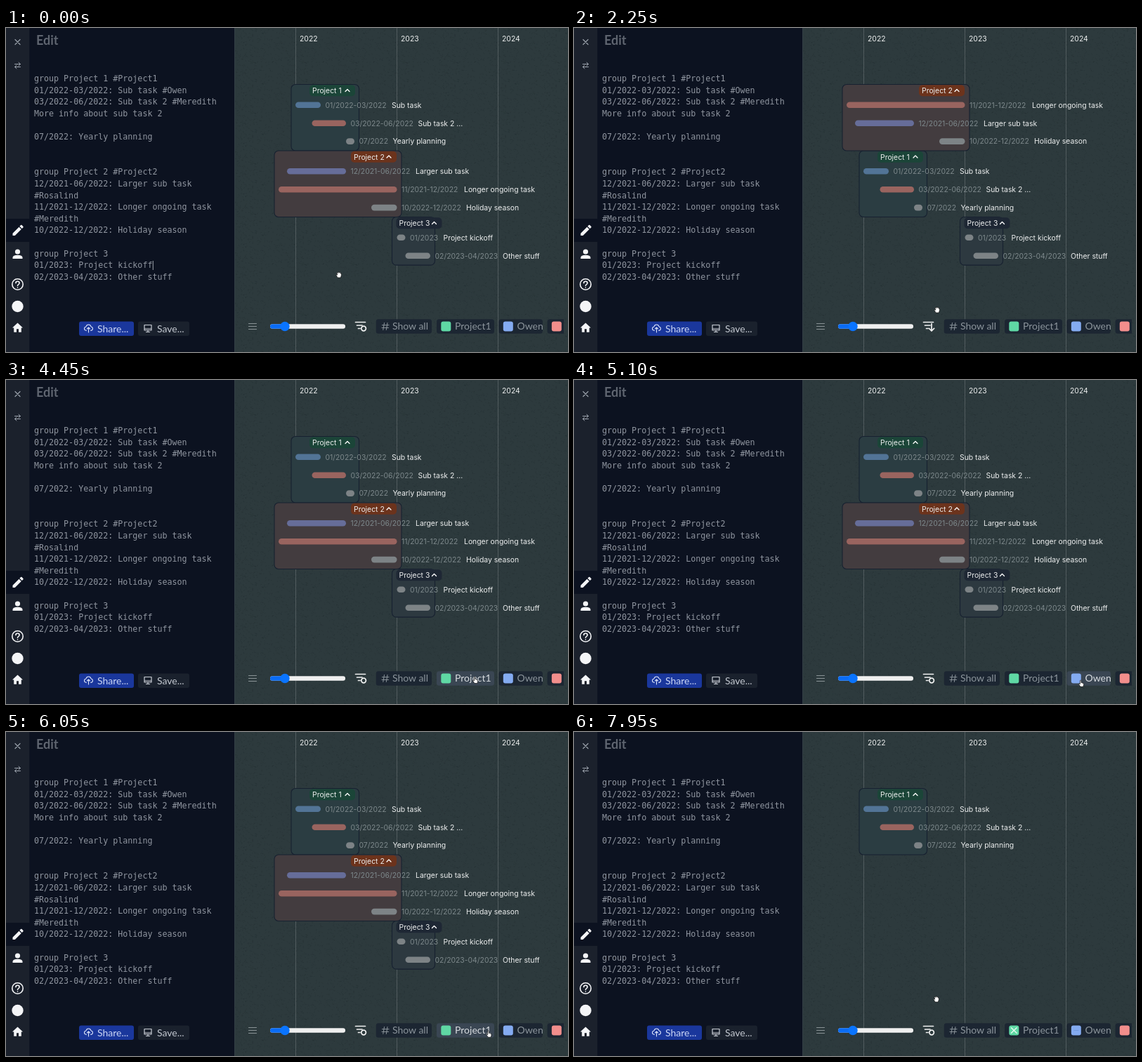
These frames come from a looping animation (800x462 px, 8 s). An HTML page:

```html
<!DOCTYPE html>
<html lang="en">
<head>
<meta charset="utf-8">
<title>Timeline editor</title>
<style>
  html, body { margin: 0; width: 100%; height: 100%; overflow: hidden; background: #0c1220; }
  svg { display: block; width: 100vw; height: 100vh; }
  text { white-space: pre; }
  .mono { font: 11.66px "DejaVu Sans Mono", monospace; fill: #8f959f; }
  .ui { font: 14px Lato, sans-serif; }
  .tl { font: 10.4px Inter, sans-serif; fill: #eceeee; }
  .date { fill: #7d888b; }
  .line { fill: none; stroke-linecap: round; stroke-linejoin: round; }
</style>
</head>
<body>
<svg id="stage" viewBox="0 0 800 462">
  <defs>
    <pattern id="grain" width="72" height="72" patternUnits="userSpaceOnUse">
      <path id="specks" class="line" stroke="#1b2629" stroke-opacity=".3" stroke-width=".9"/>
    </pattern>
    <clipPath id="chipClip"><rect x="526.5" y="410" width="267.5" height="32"/></clipPath>
  </defs>

  <rect x="325" width="475" height="462" fill="#2d3a3d"/>
  <rect x="325" width="475" height="462" fill="url(#grain)"/>
  <g id="years"></g>
  <g id="groups"></g>

  <rect width="33.5" height="462" fill="#1b212c"/>
  <rect x="33.5" width="292" height="462" fill="#0c1220"/>
  <rect y="272" width="34" height="33" fill="#0c1220"/>
  <path d="M325.5 0V462" stroke="#39444b" stroke-width=".8"/>

  <text x="43" y="24" font-family="Lato, sans-serif" font-weight="700" font-size="18" fill="#5f6570">Edit</text>
  <g id="source"></g>
  <path id="caret" d="M209.3 332V345" stroke="#c4c9d0" stroke-width=".8"/>

  <g class="line" stroke="#9aa1ab" stroke-width="1.2">
    <path d="M13 16.5l7 7m0-7l-7 7"/>
    <path d="M12.500 51.500h8m-2.500-2.500l2.500 2.500-2.500 2.500M20.500 55.500h-8m2.500-2.500l-2.500 2.500 2.500 2.500" stroke-width="1"/>
  </g>
  <g fill="#f4f5f7">
    <path d="M9.500 296v-3.300l9-9 3.300 3.300-9 9zM19.400 282.800l1.700-1.700q.7-.6 1.400 0l1.900 1.900q.6.700 0 1.400l-1.700 1.700z"/>
    <circle cx="16.500" cy="319" r="3.600"/>
    <path d="M9.500 329v-1.600q0-3.600 7-3.600t7 3.600v1.600z"/>
    <circle cx="16.500" cy="397" r="8.200"/>
    <path d="M9 427.500l7.500-7 7.500 7h-2.200v6.300h-3.800v-4.500h-3v4.500h-3.800v-6.300z"/>
  </g>
  <g class="line" stroke="#f4f5f7" stroke-width="1.600">
    <circle cx="16.500" cy="365.500" r="7.700"/>
    <path d="M13.900 363.800q0-2.500 2.600-2.500t2.600 2.300q0 1.200-1.300 2t-1.300 1.900M16.500 370v.1"/>
  </g>

  <rect x="104" y="418.500" width="78" height="20.500" rx="3" fill="#1a379c"/>
  <g class="line" stroke="#dbe3fa" stroke-width="1.100">
    <path d="M114.500 431.500q-3-.3-3-2.900 0-2.200 2.400-2.600.7-3 3.600-3t3.600 3q2.300.4 2.300 2.700 0 2.500-2.900 2.800M117.500 434v-7m-2 2l2-2 2 2"/>
  </g>
  <text x="130" y="433.500" class="ui" fill="#ccd7f6">Share...</text>
  <rect x="188" y="418.500" width="73" height="20.500" rx="3" fill="#1a212d"/>
  <path class="line" stroke="#c9ced6" stroke-width="1.200" d="M197 423.500h10v7.500h-10zM197 429h10M202 431v2.500m-2.500 0h5"/>
  <text x="215" y="433.500" class="ui" fill="#c3c8d0">Save...</text>

  <path class="line" stroke="#8b9497" stroke-width="1.200" d="M345.500 421.500h11M345.500 425.500h11M345.500 429.500h11"/>
  <rect x="376" y="422.300" width="107" height="6.500" rx="3.200" fill="#efefef"/>
  <rect x="376" y="422.300" width="22" height="6.500" rx="3.200" fill="#0a6cf5"/>
  <circle cx="397" cy="425.500" r="6.700" fill="#0a74ff"/>
  <path class="line" stroke="#f2f3f3" stroke-width="1.700" d="M497.500 419.500h14M499.500 424h7.500M501.500 428.500h2.500"/>
  <path id="sortMark" class="line" stroke="#f2f3f3" stroke-width="1.700"/>

  <g clip-path="url(#chipClip)"><g id="chips"></g></g>
  <g id="cursor" fill="#fff" stroke="#111" stroke-width=".7" stroke-linejoin="round">
    <path id="grab" d="M-2 4l-1.800-3.300q-.6-1.300.6-1.300l.9.800-.7-3q.2-1.200 1.200-.5l.5.800.3-1.200q.8-.8 1.400 0l.2 1 .7-.7q1-.2 1 .8v1l.6-.4q.8 0 .7 1l-.5 2.700-.8 2.300z"/>
    <path id="point" d="M-1 4.500l-2.400-3.400q-.5-1.300.8-1l1 .9v-4.700q0-1.100.8-1.100t.8 1.100v2.500q1-.4 1.300.3 1-.3 1.200.5 1.100-.2 1.100.8v1.700l-.8 2.400z"/>
  </g>
</svg>
<script>
const LOOP = 8000, FILTER_AT = 6300;
const $ = id => document.getElementById(id);

function add(parent, tag, attrs, text) {
  const el = document.createElementNS("http://www.w3.org/2000/svg", tag);
  for (const key in attrs) el.setAttribute(key, attrs[key]);
  if (text) el.textContent = text;
  parent.appendChild(el);
  return el;
}
const move = (el, x, y) => el.setAttribute("transform", `translate(${x} ${y})`);
const show = (el, on) => el.setAttribute("visibility", on ? "visible" : "hidden");

// Background grain
let seed = 7;
const rand = () => (seed = (seed * 16807) % 2147483647) / 2147483647;
let specks = "";
for (let i = 0; i < 330; i++) {
  specks += `M${(rand() * 72).toFixed(1)} ${(rand() * 72).toFixed(1)}l${(rand() * 4 - 2).toFixed(1)} ${(rand() * 3 - 1).toFixed(1)}`;
}
$("specks").setAttribute("d", specks);

// Year columns
[2022, 2023, 2024].forEach((year, i) => {
  const x = 412.5 + i * 144;
  add($("years"), "path", { d: `M${x} 0V462`, stroke: "#fff", "stroke-opacity": .2, "stroke-width": .9 });
  add($("years"), "text", { x: x + 5.5, y: 18.5, class: "tl" }, String(year));
});

// Editor text
`group Project 1 #Project1
01/2022-03/2022: Sub task #Owen
03/2022-06/2022: Sub task 2 #Meredith
More info about sub task 2

07/2022: Yearly planning


group Project 2 #Project2
12/2021-06/2022: Larger sub task
#Rosalind
11/2021-12/2022: Longer ongoing task
#Meredith
10/2022-12/2022: Holiday season

group Project 3
01/2023: Project kickoff
02/2023-04/2023: Other stuff`.split("\n").forEach((line, i) =>
  add($("source"), "text", { x: 40, y: 76 + i * 16.65, class: "mono" }, line));

// Timeline groups; tasks are [bar start, bar end, colour, dates, name x, name]
const BLUE = "#527496", RED = "#99645f", GREY = "#7d8386", VIOLET = "#666d99";
const groups = [
  { name: "Project 1", x: 406, w: 96.5, pill: 432, fill: "#2b3d42", tint: "#1b4538", tasks: [
    [412, 448, BLUE, "01/2022-03/2022", 549, "Sub task"],
    [435.5, 484, RED, "03/2022-06/2022", 586.5, "Sub task 2 ..."],
    [484, 496, GREY, "07/2022", 550.5, "Yearly planning"]] },
  { name: "Project 2", x: 382, w: 181, pill: 491, fill: "#433c3f", tint: "#6c331c", tasks: [
    [400, 484, VIOLET, "12/2021-06/2022", 583, "Larger sub task"],
    [388, 556.5, RED, "11/2021-12/2022", 652, "Longer ongoing task"],
    [520, 556.5, GREY, "10/2022-12/2022", 655, "Holiday season"]] },
  { name: "Project 3", x: 549.5, w: 61, pill: 555.5, fill: "#2d3940", tint: "#1e2734", tasks: [
    [556.5, 568.5, GREY, "01/2023", 622.5, "Project kickoff"],
    [568.5, 604, GREY, "02/2023-04/2023", 707, "Other stuff"]] }
];
for (const g of groups) {
  g.h = 16.8 + g.tasks.length * 25.9;
  g.el = add($("groups"), "g", {});
  add(g.el, "rect", { x: g.x, y: 0, width: g.w, height: g.h, rx: 6, fill: g.fill, stroke: "#172130", "stroke-width": 1.1 });
  add(g.el, "rect", { x: g.pill, y: .7, width: 65, height: 16, rx: 5, fill: g.tint });
  add(g.el, "text", { x: g.pill + 4, y: 12.6, class: "tl" }, g.name);
  add(g.el, "path", { d: `M${g.pill + 51} 10l3-3 3 3`, class: "line", stroke: "#fff", "stroke-width": 1.3 });
  g.rows = g.tasks.map(([x0, x1, fill, dates, nameX, name]) => {
    const el = add(g.el, "g", {});
    add(el, "rect", { x: x0, y: -4.3, width: x1 - x0, height: 8.6, rx: 4.3, fill });
    add(el, "text", { x: x1 + 6.5, y: 3.8, class: "tl date" }, dates);
    add(el, "text", { x: nameX, y: 3.8, class: "tl" }, name);
    return { el, start: x0 };
  });
}

// Tag chips
const chips = [
  { x: 526.5, w: 79.5, label: "Show all" },
  { x: 613, w: 82, label: "Project1", color: "#5fd8a4" },
  { x: 701.5, w: 62.5, label: "Owen", color: "#84abf1" },
  { x: 770.5, w: 90, label: "Meredith", color: "#f28e8c" }
];
for (const c of chips) {
  c.bg = add($("chips"), "rect", { x: c.x, y: 415.3, width: c.w, height: 20.5, rx: 3.5 });
  if (c.color) add($("chips"), "rect", { x: c.x + 6.3, y: 418.5, width: 14, height: 14, rx: 3, fill: c.color });
  else add($("chips"), "path", { d: "M538.500 420.500l-1.700 10M543 420.500l-1.700 10M535.500 423.700h9.500M535 427.400h9.500", class: "line", stroke: "#8b949b", "stroke-width": 1 });
  c.text = add($("chips"), "text", { x: c.x + (c.color ? 26 : 23.5), y: 430.3, class: "ui" }, c.label);
}
const marks = add($("chips"), "g", { class: "line", stroke: "#e3faf0" });
add(marks, "path", { d: "M622.500 421.700l7.600 7.600m0-7.600l-7.600 7.600", "stroke-width": 1.500 });
add(marks, "path", { d: "M712 425.500h6", stroke: "#5f86cb", "stroke-opacity": .5, "stroke-width": 1.200 });

// Motion
const path = [
  [0, 474, 352], [1250, 508, 427], [1600, 508, 427], [2250, 517, 402], [2650, 508, 427],
  [2850, 508, 427], [3300, 556, 388], [3650, 508, 427], [3850, 508, 427], [4300, 662, 428],
  [4450, 668, 428], [4850, 668, 428], [5200, 735, 434], [5500, 738, 435], [5850, 738, 435],
  [6200, 655, 428], [6350, 655, 428], [6700, 508, 427.5], [7450, 508, 427.5], [7950, 516, 381], [8000, 516, 381]
];
const scroll = [[0, 0], [5100, 0], [5400, -12], [5650, -12], [5950, 0], [8000, 0]];
const sorts = [[0, 0], [1600, 1], [2800, 2], [3750, 0], [6750, 1], [7100, 2], [7400, 0]];
const sortMarks = [
  "M505.800 428.500a3.300 3.300 0 1 0 6.600 0a3.300 3.300 0 1 0-6.600 0",
  "M509 421.500v10.500m-3.600-3.600l3.600 3.600 3.600-3.600",
  "M509 432v-10.500m-3.600 3.600l3.600-3.600 3.600 3.600"
];

function tween(keys, t) {
  const i = Math.max(1, keys.findIndex(k => k[0] > t));
  const a = keys[i - 1], b = keys[i], u = (t - a[0]) / (b[0] - a[0]);
  const e = u * u * (3 - 2 * u);
  return a.slice(1).map((v, n) => v + (b[n + 1] - v) * e);
}

function arrange(mode, filtered) {
  const order = (list, key) => mode === 0 ? list
    : [...list].sort((a, b) => mode === 1 ? key(a) - key(b) : key(b) - key(a));
  let y = 80.5;
  for (const g of order(groups, g => g.x)) {
    const on = !filtered || g === groups[0];
    show(g.el, on);
    if (!on) continue;
    move(g.el, 0, y);
    order(g.rows, r => r.start).forEach((r, i) => move(r.el, 0, 29.3 + i * 25.9));
    y += g.h;
  }
}

function draw(t) {
  const mode = sorts.filter(s => s[0] <= t).pop()[1];
  const filtered = t >= FILTER_AT;
  arrange(mode, filtered);
  $("sortMark").setAttribute("d", sortMarks[mode]);
  show($("caret"), t < 1600 && t % 1000 < 500);
  show(marks, filtered);

  const [dx] = tween(scroll, t), [x, y] = tween(path, t);
  move($("chips"), dx, 0);
  let pointing = y > 415 && x > 495 && x < 515;
  for (const c of chips) {
    const left = c.x + dx;
    const hover = y > 415 && y < 436 && x > left && x < left + c.w;
    pointing = pointing || hover;
    c.bg.setAttribute("fill", hover ? "#3a4653" : "#1c2632");
    c.text.setAttribute("fill", hover ? "#d8dce0" : "#8b949b");
  }
  move($("cursor"), x, y);
  show($("grab"), !pointing);
  show($("point"), pointing);
}

const begin = performance.now();
function tick() {
  draw((performance.now() - begin) % LOOP);
  requestAnimationFrame(tick);
}
tick();
</script>
</body>
</html>
```
